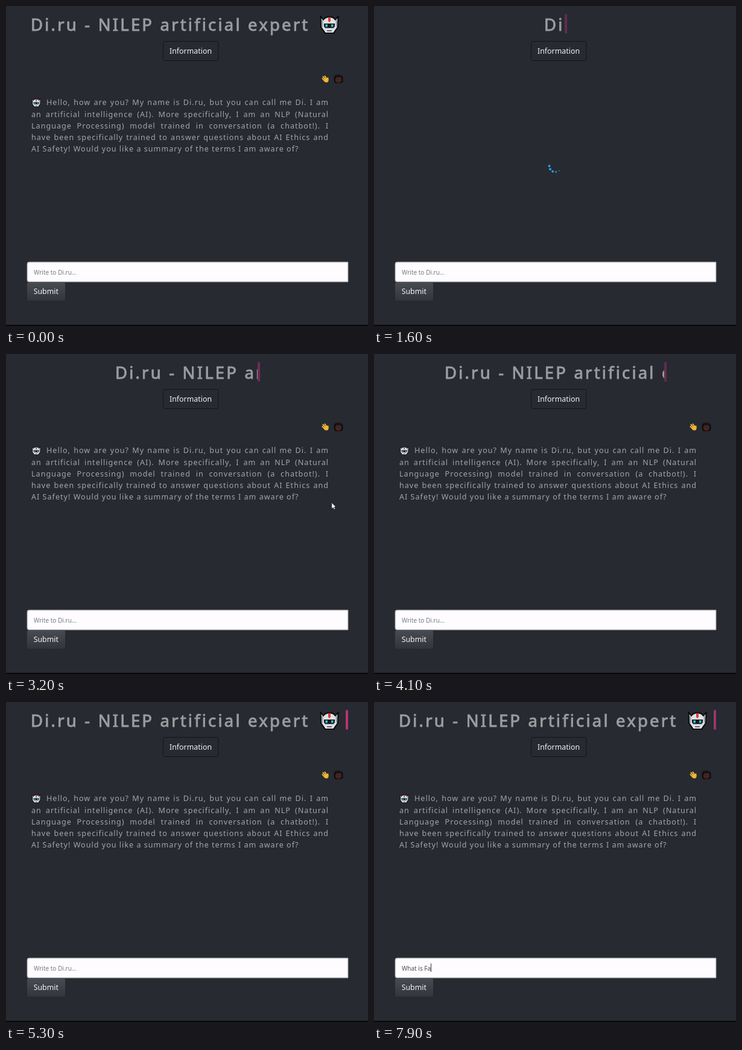
Animation, 600 px wide and 530 px high, one loop 8000 ms. Source, as an HTML page:

```html
<!DOCTYPE html>
<html lang="en">
<head>
<meta charset="utf-8">
<style>
  html, body { margin: 0; width: 100%; height: 100%; overflow: hidden; background: #272a31; }
  body, svg text { font-family: "Noto Sans", "Open Sans", sans-serif; }
  #stage { position: absolute; left: 0; top: 0; width: 600px; height: 530px; overflow: hidden; }
  #stage svg { position: absolute; left: 0; top: 0; }
  #title { font-size: 27.5px; letter-spacing: 3.2px; fill: #9c9c9f; stroke: #9c9c9f; stroke-width: .9px; white-space: pre; }
  .button { font-size: 12.4px; fill: #f4f4f5; }
  #field { font-size: 10px; white-space: pre; }
  #reply { position: absolute; left: 42px; top: 150.3px; width: 493px;
    font-size: 12.6px; line-height: 19.2px; letter-spacing: 1px; color: #a5a5a8; }
  #reply div { white-space: nowrap; text-align-last: justify; }
  #reply div:first-child { margin-left: 25px; }
  #reply div:last-child { text-align-last: left; }
</style>
</head>
<body>
<div id="stage">
  <svg width="600" height="530" viewBox="0 0 600 530">
    <defs>
      <linearGradient id="metal" x2="0" y2="1">
        <stop stop-color="#484b51"/><stop offset="1" stop-color="#32353b"/>
      </linearGradient>
      <clipPath id="window"><rect id="windowRect" y="8" height="44"/></clipPath>
      <g id="robot" stroke-linejoin="round">
        <path d="M1.5 1 L6 7 Q9 2 16 2 Q23 2 26 7 L30.5 1 L30 19 L27 23 L23 29 H9 L5 23 L2 19Z" fill="#dfe0e2" stroke="#08090b" stroke-width="2"/>
        <path d="M3 6 L5.5 9 L5 20 L3.3 18Z M29 6 L26.5 9 L27 20 L28.7 18Z" fill="#8f959c"/>
        <path d="M14 2.5 H18 V9 L16 11 L14 9Z" fill="#e03a32"/>
        <path d="M7 13 H25 V18 L23 20.5 H9 L7 18Z" fill="#15181d"/>
        <path d="M9.5 14.5 H13 V18.5 H9.5Z M19 14.5 H22.5 V18.5 H19Z" fill="#35c6d3"/>
        <path d="M12 25 H20" stroke="#44484e" stroke-width="1.6"/>
      </g>
    </defs>
    <rect width="600" height="530" fill="#272a31"/>
    <rect y="528" width="600" height="2" fill="#08090b"/>

    <g clip-path="url(#window)">
      <g id="heading">
        <text id="title" y="41">Di.ru - NILEP artificial expert</text>
        <use href="#robot" x="479" y="16"/>
      </g>
    </g>
    <rect id="bar" y="13.5" width="4" height="32" fill="#b53377"/>

    <rect x="260.5" y="58.5" width="91.5" height="32" rx="3" fill="#272a31" stroke="#121417"/>
    <text class="button" x="306" y="79" text-anchor="middle">Information</text>

    <g id="chat">
      <use href="#robot" transform="translate(42.5 153) scale(.48)"/>
      <g id="wave" stroke-linecap="round" stroke-linejoin="round">
        <path d="M525.5 117 L530 122 M528.5 116 L532 121 M524.5 120 L529 125" stroke="#efb734" stroke-width="2"/>
        <path d="M527 120 L532.5 119 L534 118 Q535.5 121 534.3 125 Q532 127.5 529 126Z" fill="#efb734"/>
      </g>
      <g id="person">
        <path d="M543.5 120 Q543 114 549 114 Q552 112 555 115 Q559 115 558.5 121 Q560 126 555 128 H547 Q543 127 543.5 120Z" fill="#120e0f"/>
        <ellipse cx="551" cy="122" rx="5" ry="5.3" fill="#472823"/>
        <path d="M546 118.5 Q551 119.5 556 116.5 L553 114 H548Z" fill="#1a1314"/>
        <path d="M548.7 121 V122 M553.3 121 V122" stroke="#120d0d" stroke-width="1.3"/>
        <path d="M549 125 Q551 126 553 125" fill="none" stroke="#2b1513"/>
      </g>
    </g>

    <g id="spinner" fill="#23a3dc"></g>

    <path d="M38 424 H567 V457 H38 Q35 457 35 454 V427 Q35 424 38 424Z" fill="#fefcff" stroke="#8d8d94"/>
    <text id="field" x="46" y="444.5"></text>
    <rect id="caret" y="433" width="1" height="14" fill="#333"/>
    <rect x="35" y="457.5" width="63" height="30.5" rx="3" fill="url(#metal)"/>
    <text class="button" x="66.3" y="477" text-anchor="middle">Submit</text>
  </svg>

  <div id="reply">
    <div>Hello, how are you? My name is Di.ru, but you can call me Di. I am</div>
    <div>an artificial intelligence (AI). More specifically, I am an NLP (Natural</div>
    <div>Language Processing) model trained in conversation (a chatbot!). I</div>
    <div>have been specifically trained to answer questions about AI Ethics and</div>
    <div>AI Safety! Would you like a summary of the terms I am aware of?</div>
  </div>

  <svg width="600" height="530">
    <path id="pointer" d="M0 0 V10 L2.4 7.9 L4 11.3 L5.8 10.4 L4.2 7.2 H7Z" fill="#fff" stroke="#111" stroke-width=".6"/>
  </svg>
</div>

<script>
const LOOP = 8000, CLEAR = 100, TYPE_START = 1300, REPLY = 2400;
const CENTER = 301, BAR = 4, TITLE_WIDTH = 516;
const QUERY = "What is Fa";
const KEY_TIMES = [6200, 6290, 6380, 6470, 6550, 6620, 6690, 6760, 7500, 7800];
const WIDTHS = [[TYPE_START, 4], [1600, 38], [1800, 60], [3200, 240], [4100, 368], [5250, 532]];
const BLINK = [[0, 0], [.2, .42], [.4, .5], [.6, 1], [.8, .87], [1, 0]];
const POINTER_X = [[2900, 574], [3200, 540], [3700, 470], [4000, 430]];
const POINTER_Y = [[2900, 290], [3200, 246], [3700, 400], [4000, 515]];

const el = id => document.getElementById(id);
const set = (id, attrs) => Object.entries(attrs).forEach(([k, v]) => el(id).setAttribute(k, v));
const show = (id, on) => { el(id).style.display = on ? "" : "none"; };

function track(points, t) {
  if (t <= points[0][0]) return points[0][1];
  for (let i = 1; i < points.length; i++) {
    const [t0, a] = points[i - 1], [t1, b] = points[i];
    if (t <= t1) return a + (b - a) * (t - t0) / (t1 - t0);
  }
  return points[points.length - 1][1];
}

const DOT_SIZES = [2, 2, 1.9, 1.4, .8];
const dots = DOT_SIZES.map(r => {
  const dot = document.createElementNS("http://www.w3.org/2000/svg", "circle");
  dot.setAttribute("r", r);
  return el("spinner").appendChild(dot);
});

function drawTitle(t) {
  const intro = t < CLEAR, typing = t >= TYPE_START;
  const width = intro ? 532 : typing ? track(WIDTHS, t) : 0;
  const left = CENTER - width / 2;
  const inset = Math.max(0, (width - BAR - TITLE_WIDTH) / 2);
  set("windowRect", { x: left, width: Math.max(0, width - BAR) });
  set("heading", { transform: `translate(${left + inset} 0)` });
  set("bar", { x: left + width - BAR, opacity: typing ? track(BLINK, t % 500 / 500) : 0 });
}

function drawSpinner(t) {
  const head = Math.PI + (t - 1600) / 1200 * 2 * Math.PI;
  dots.forEach((dot, i) => {
    const angle = head - i * .56;
    dot.setAttribute("cx", 300.5 + 10 * Math.cos(angle));
    dot.setAttribute("cy", 265 + 10 * Math.sin(angle));
  });
}

function drawField(t) {
  const typed = QUERY.slice(0, KEY_TIMES.filter(k => t >= k).length);
  const field = el("field");
  field.textContent = typed || "Write to Di.ru...";
  field.setAttribute("fill", typed ? "#4b4e53" : "#777b80");
  show("caret", typed);
  set("caret", { x: Math.floor(46 + (typed ? field.getComputedTextLength() : 0)) });
}

function render(t) {
  const chatting = t < CLEAR || t >= REPLY;
  show("chat", chatting);
  show("reply", chatting);
  show("spinner", !chatting);
  show("pointer", t >= 2900 && t < 4000);
  set("pointer", { transform: `translate(${track(POINTER_X, t)} ${track(POINTER_Y, t)})` });
  drawTitle(t);
  drawSpinner(t);
  drawField(t);
}

const start = performance.now();
function tick() {
  render((performance.now() - start) % LOOP);
  requestAnimationFrame(tick);
}
tick();
</script>
</body>
</html>
```
